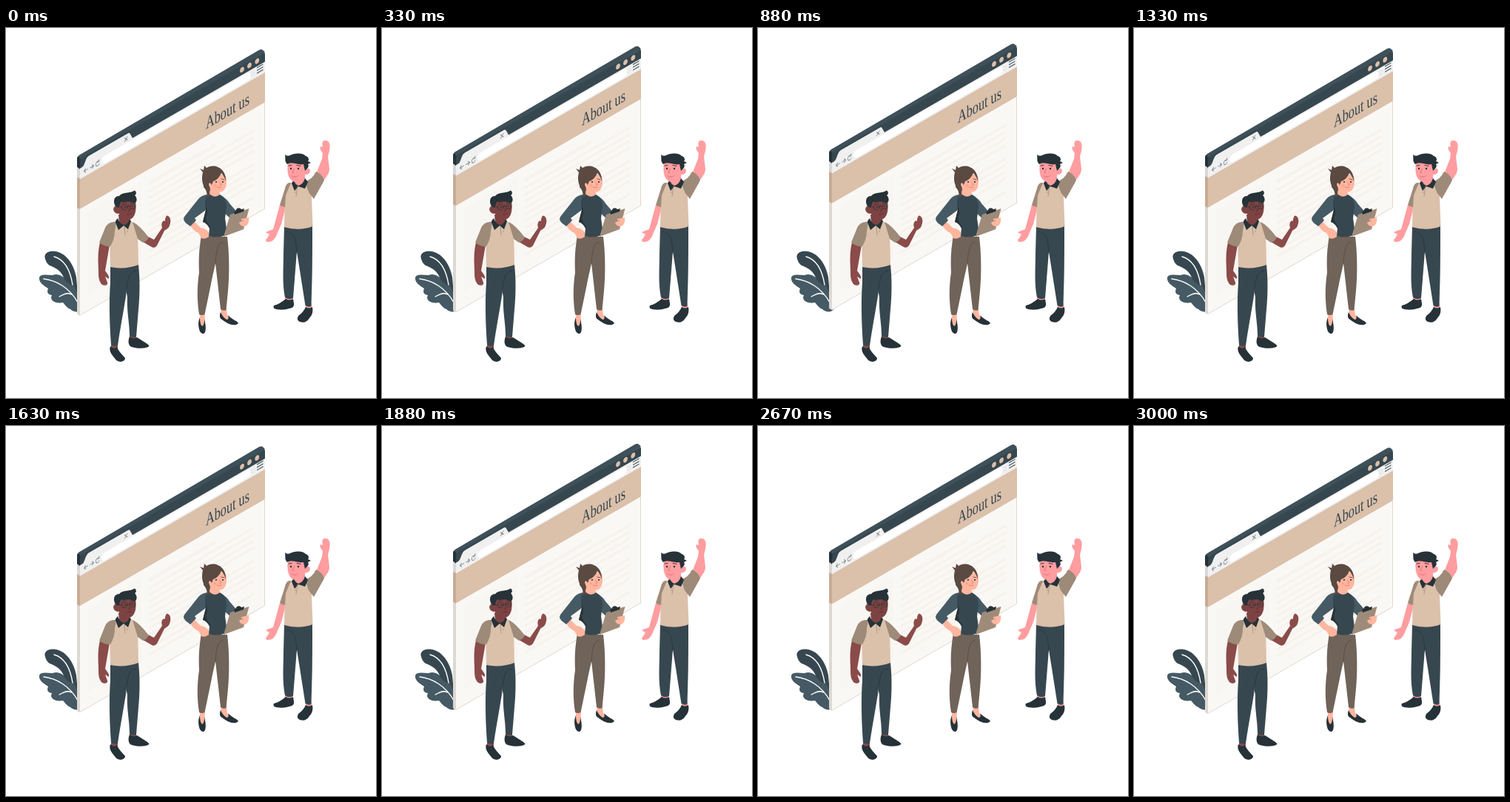
An HTML page that plays this animation: 500x500 px, repeating every 3040 ms.

```html
<!DOCTYPE html>
<html lang="en">
<head>
<meta charset="utf-8">
<title>About us</title>
<style>
  html, body { margin: 0; width: 100%; height: 100%; overflow: hidden; background: #fff; }
  svg { display: block; width: 100%; height: 100%; }
  .ink { fill: #263238; }
  .slate { fill: #37474f; }
  .steel { fill: #455a64; }
  .tan { fill: #dbc0aa; }
  .sleeve { fill: #9d8a79; }
  .brown { fill: #8a4b49; }
  .face { fill: #7d4342; }
  .peach { fill: #ffb69f; }
  .pink { fill: #ff9da0; }
  .trousers { fill: #70635a; }
  .hair { fill: #5a4a42; }
  .line { fill: none; stroke-linecap: round; stroke-linejoin: round; }
  text { font: 23.5px "Liberation Serif", "Noto Serif", serif; }
</style>
</head>
<body>
<svg viewBox="0 0 500 500">
  <!-- plant -->
  <path class="steel" d="M45 337C47 332 56 334 63 334C70 331 78 335 83 343C90 344 97 350 97 357L103 378C101 385 92 385 87 380C82 378 80 374 77 371C67 373 58 368 62 361C56 360 55 357 57 352C51 348 44 344 45 337Z"/>
  <path class="slate" d="M53 312C50 304 59 300 68 302C82 305 92 320 95 337L97 360L92 348C84 347 79 341 77 335C73 327 65 323 59 321C56 319 54 316 53 312Z"/>
  <path class="line" stroke="#fff" stroke-width="1.400" d="M65 309C79 313 87 328 90 347M51 339C68 341 86 351 97 371M72 363C79 359 84 357 88 360"/>

  <!-- browser window -->
  <g id="panel">
    <path fill="#ddd8d1" d="M96 189L100 191V389L97 387.500Q96 387 96 385Z"/>
    <path fill="#d8d8d8" d="M96 188L100 190V205L96 203Z"/>
    <path fill="#c8ab94" d="M96 202L100 204V245L96 243Z"/>
    <path fill="#3e5059" d="M96 178Q96 174 99 172L342 30Q345 28.500 347 30L350 33L100 180Z"/>
    <path class="ink" d="M96 177Q96 174 98 174L101 178L100 191L96 188Z"/>
    <g transform="matrix(1 -.577 0 1 100 0)">
      <path class="slate" d="M0 181Q0 177 4 177H246Q250 176 250 180V191H0Z"/>
      <path fill="#f0f0f0" d="M0 190H3Q5 190 6 187L8 183Q9 180 12 180H65Q67 180 68 183L71 190H250V205H0Z"/>
      <rect fill="#fff" x="29" y="192" width="202" height="10.500" rx="5"/>
      <rect class="tan" y="204.500" width="250" height="40.500"/>
      <rect fill="#faf8f5" y="245" width="250" height="144"/>
      <path class="line" stroke="#e0d8cf" d="M.5 388.500H249.500V245"/>
      <rect fill="#f8f6f2" x="11" y="255" width="72" height="113"/>
      <g id="copy" fill="#f6f2ed"></g>
      <g class="line" stroke="#79858a">
        <path stroke-width=".9" d="M10.500 197H5.500M7.500 194.500L5.500 197L7.500 199.500M13.500 197H18.500M16.500 194.500L18.500 197L16.500 199.500M25.500 195A2.500 3 0 1 0 26 198.500M25.800 192.800V195.300H23.500"/>
        <path stroke-width="1" d="M60.500 184L64 188.500M64 184L60.500 188.500"/>
        <path stroke="#54636b" stroke-width="1.400" stroke-linecap="butt" d="M239 192H247.500M239 195.700H247.500M239 199.400H247.500"/>
        <circle stroke="#ddd" stroke-width=".8" cx="233.500" cy="197" r="2.300"/>
      </g>
      <g class="tan">
        <ellipse cx="219" cy="183" rx="2.900" ry="3.500"/>
        <ellipse cx="229" cy="183" rx="2.900" ry="3.500"/>
        <ellipse cx="239.300" cy="183" rx="2.900" ry="3.500"/>
      </g>
      <text class="slate" transform="matrix(.69 0 0 1 170 235)">About us</text>
    </g>
  </g>

  <!-- man with glasses -->
  <g>
    <path class="brown" d="M127 290C123 305 125 320 125 331C125 338 126 343 130 347C134 349 138 347 137 344L134 336L139 339C140 335 136 331 134 328L140 293Z"/>
    <path class="brown" d="M190 281L200 286L211 270C209 264 212 259 215 261C215 256 217 252 219 254C223 256 223 262 221 267C220 271 216 272 214 274L204 294Q201 298 197 296L185 289Z"/>
    <path class="brown" d="M142 425H151V434H142ZM167 414H176V421H167Z"/>
    <path class="ink" d="M141 430C138 438 145 443 149 449C155 453 161 450 161 446C157 441 152 437 150 431Q146 435 141 430ZM167 417C164 424 166 430 170 431C178 434 190 433 193.500 430C193 427 184 423 177 418Q172 421 167 417Z"/>
    <path class="slate" d="M156 320H179C181 340 181 358 179 380L176 417Q171 419 167 416C167 398 163 384 164 364Z"/>
    <path class="slate" d="M141 320H168L164 346C162 368 155 400 151 429Q146 431 142 428C140 400 139 370 141 344Z"/>
    <path class="line" stroke="#263238" stroke-width=".7" d="M176 328Q167 329 165 340L163 352"/>
    <path class="tan" d="M149 262Q140 263 140 278L141 323Q160 327 179 320L178 275Q178 262 166 261Z"/>
    <path class="sleeve" d="M149 262Q138 261 134 270L126 290Q133 296 141 295Q147 285 147 274ZM171 262Q180 266 193 283Q191 288 185 290L178 285Z"/>
    <path class="face" d="M152 252H167V264Q162 270 153 264Z"/>
    <path class="ink" d="M151 257Q147 261 148 263L152 273L159 267L165 272L169 261L167 258Q165 266 159 266Q153 264 151 257Z"/>
    <path class="line" stroke="#a18d7b" stroke-width=".8" d="M160 268L161 280"/>
    <circle fill="#a18d7b" cx="164" cy="275" r=".8"/>
    <path class="face" d="M151 234Q162 229 175 234C177 247 174 258 166 259Q157 259 153 251Q146 251 145 245Q146 239 151 241Z"/>
    <path class="ink" d="M148 241C144 234 146 227 153 227C157 221 168 224 174 219.500C177 222 176 225 174 226C178 230 177 235 174 237C168 233 161 235 155 235L152 243Z"/>
    <g class="line" stroke="#263238" stroke-width=".7">
      <circle cx="160" cy="242" r="3.800"/><circle cx="171" cy="241" r="3.600"/>
      <path d="M164 241Q166 240 167.500 241M156 242L150 241M158 236L162 235.500M169 235.500L173 236"/>
      <path stroke="#54292a" d="M166 243L167 247L165 247.500M163 252L169 251"/>
    </g>
    <circle class="ink" cx="161" cy="242" r="1"/><circle class="ink" cx="170.500" cy="241" r="1"/>
  </g>

  <!-- woman with clipboard -->
  <g>
    <path class="peach" d="M262 384H269L268 404Q264 407 262 402ZM290 378H298L299 388L307 396Q297 396 291 390Z"/>
    <path class="ink" d="M262 391C259 398 260 404 262 410Q266 416 269 411C271 405 269 398 268 393Q268 402 265 403Q262 400 262 391ZM290 384C288 389 289 393 292 394C299 400 309 404 314 399C313 396 305 394 300 388Q302 394 298 394Q293 391 290 384Z"/>
    <path class="trousers" d="M276 282H299C302 306 302 335 300 355L297.500 381Q294 383 290 380L283 318Z"/>
    <path class="trousers" d="M264 280L287 282C288 303 281 325 277 346L268.500 387Q265 389 261 387C258 368 258 350 261 330C260 312 261 298 264 280Z"/>
    <path class="line" stroke="#51463f" stroke-width=".7" d="M293 289Q286 291 284 306L283 318"/>
    <path class="peach" d="M248 264L255 262L263 270Q269 270 274 276L274 282Q269 286 264 284L260 277Q251 273 248 264Z"/>
    <path class="steel" d="M272 225Q264 226 260 231L241 255Q238 260 245 265L249 268L257 260L255 257L270 246ZM292 228Q298 230 302 237L314 251L305 259L295 250Z"/>
    <path class="slate" d="M273 224L289 225Q298 229 298 242L296 257L299 279Q286 285 274 281L275 270Q272 264 266 262L270 246Q267 230 273 224Z"/>
    <path class="ink" d="M270 240Q274 250 270 256Q271 264 276 268L275 271Q272 264 266 262L270 246Z"/>
    <path class="hair" d="M268 208H279V220Q276 230 271 228Q273 221 267 215Z"/>
    <path class="peach" d="M276 213H288L289 225Q282 231 275 224Z"/>
    <path class="peach" d="M276 202Q287 194 297 200C300 212 296 222 289 221.500Q281 221 278 216Q274 216 273.500 211Q274 207 277 209Z"/>
    <path class="hair" d="M266 195L262 190L267 192L268 186L271 189C282 182 298 190 297 207Q295 200 291 196Q287 205 280 207L278 212Q275 207 274 211L276 220C267 219 263 207 266 195Z"/>
    <circle class="ink" cx="284" cy="208" r="1.100"/><circle class="ink" cx="293" cy="208" r="1.100"/>
    <path class="line" stroke="#4e4039" stroke-width=".8" d="M282 204.500L285 203.500M291 204L295 205"/>
    <path class="line" stroke="#d97868" stroke-width=".8" d="M289 208L291 212L289 212.500M285 215Q288 217 291 215"/>
    <circle fill="#f7947f" opacity=".5" cx="282" cy="213" r="2"/>
    <path fill="#9f8b79" d="M303 252L328.500 244L321 272L294 282Z"/>
    <path class="ink" d="M308 248Q311 247 312 244Q316 242 318 245L322 244L321 248L309 252Z"/>
    <path class="peach" d="M328 256Q329 266 323 268Q317 269 315 263Q317 261 322 261Q317 260 318 258Z"/>
  </g>

  <!-- waving man -->
  <g>
    <path class="pink" d="M370 239L378 242L372 265L366 279Q362 290 353 289Q349 288 353 284L356 279L351 276Q355 274 361 272Z"/>
    <path class="pink" d="M419 197L427 177L428 169Q423 163 425 160L428 161Q426 153 430 152C437 151 439 157 437 166L435 174L437 190Q437 196 433 201L426 211Z"/>
    <path class="pink" d="M377 361H387V371H377ZM405 372H413V381H405Z"/>
    <path class="ink" d="M378 366Q370 373 362 375Q360 379 365 380Q375 382 383 379Q390 378 389 372L388 366Q383 369 378 366ZM405 377Q402 384 395 389Q392 395 397 397Q405 400 410 392Q416 386 414 377Q409 380 405 377Z"/>
    <path class="slate" d="M376 267H402L393 302L388 365Q382 368 377 364C373 345 375 325 375 305Z"/>
    <path class="slate" d="M391 268H414C414 290 414 320 413.500 340L412.500 376Q409 378 404.500 375L393 302Z"/>
    <path class="line" stroke="#263238" stroke-width=".7" d="M380 275Q391 277 392 292L393 304"/>
    <path class="tan" d="M386 209Q377 210 377 222L376 269Q396 275 414.500 268L413 228Q415 210 403 206Z"/>
    <path class="sleeve" d="M385 209Q379 208 377 217L370 239Q373 242 377 242L378 226ZM404 207Q413 206 419 194Q428 198 430 206L416 231L409 222Z"/>
    <path class="pink" d="M389 200H404V208Q396 220 389 209Z"/>
    <path class="ink" d="M389 205L386 210L390 220L395 214L404 217L408 208L404 203Q402 211 395 213Q390 211 389 205Z"/>
    <path class="line" stroke="#a18d7b" stroke-width=".8" d="M394 214L392 227"/>
    <circle fill="#a18d7b" cx="391" cy="222" r=".8"/>
    <path class="pink" d="M381 182Q393 176 406 185L405 192Q409 187 411 192Q411 198 405 198Q401 206 392 208C382 208 379 195 381 182Z"/>
    <path class="ink" d="M380 184C376 180 378 176 377 171Q380 174 384 172C389 169 401 168 405 173C409 174 410 178 408 180L412 182L408 184Q410 187 407 190L404 193L402 184C395 186 388 180 380 184Z"/>
    <circle class="ink" cx="385" cy="190" r="1.200"/><circle class="ink" cx="395" cy="190" r="1.200"/>
    <path class="line" stroke="#263238" stroke-width=".9" d="M382 186L386 185.500M393 185.500L398 186.500"/>
    <path class="line" stroke="#d9666c" stroke-width=".8" d="M389 190L387 195L389 196M386 200Q390 203 394 200"/>
  </g>
</svg>
<script>
  const panel = document.getElementById('panel');
  const copy = document.getElementById('copy');
  const HALF = 755, RISE = 10, LEAD = 20, LOOP = 3040;

  const bar = (y, width, height) =>
    `<rect x="93" y="${y}" width="${width}" height="${height}" rx="1"/>`;
  let bars = bar(261.5, 90, 5);
  for (let i = 0; i < 11; i++) bars += bar(273 + i * 9, i % 5 === 4 ? 105 : 142, 3.5);
  copy.innerHTML = bars;

  // Linear float: up for one half period, down for the next.
  function draw(now) {
    const phase = ((now % LOOP + LEAD) / HALF) % 2;
    const lift = RISE * (1 - Math.abs(1 - phase));
    panel.setAttribute('transform', `translate(0 ${-lift})`);
    requestAnimationFrame(draw);
  }
  draw(0);
</script>
</body>
</html>
```
